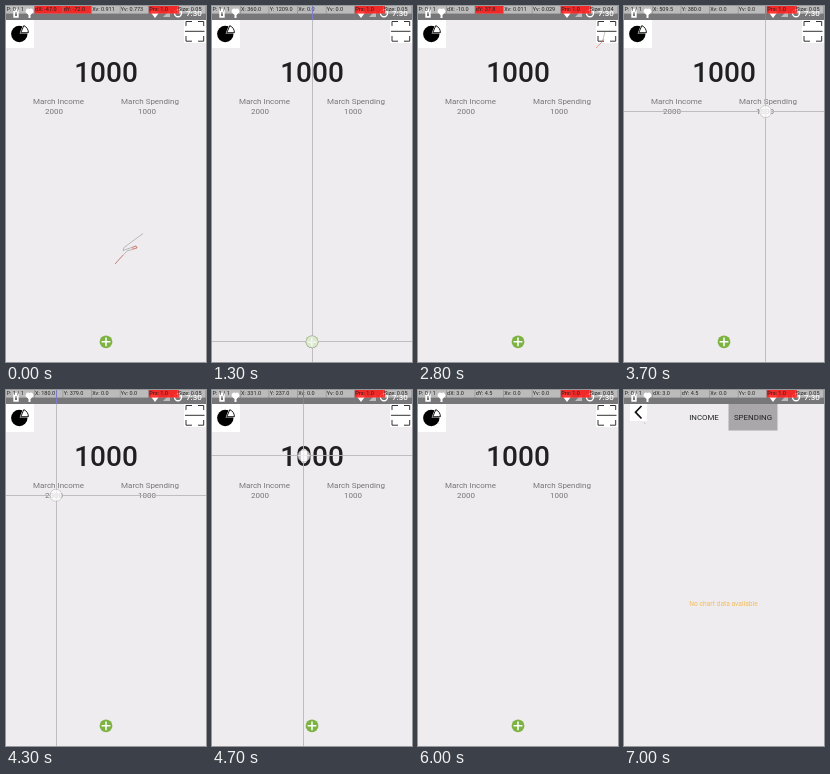
Animation, 200 px wide and 356 px high, one loop 8000 ms. Source, as an HTML page:

```html
<!DOCTYPE html>
<html lang="en">
<head>
<meta charset="utf-8">
<title>Budget overview</title>
<style>
html, body { margin: 0; width: 100%; height: 100%; overflow: hidden; background: #eeecef; }
svg { display: block; width: 100%; height: 100%; }
text { font-family: Roboto, sans-serif; }
.mid { text-anchor: middle; }
.label { font-size: 8px; fill: #767577; }
.tab { font-size: 7.9px; fill: #222; }
.cell { font-size: 5.5px; fill: #222; }
</style>
</head>
<body>
<svg viewBox="0 0 200 356">
  <rect width="200" height="356" fill="#eeecef"/>
  <g id="home">
    <path d="M0 14H28V42H0ZM178 14H200V37H178Z" fill="#fff"/>
    <circle cx="13.3" cy="28" r="8.2"/>
    <path d="M13.6 27.6L17.4 18H24V27.6Z" fill="#fff"/>
    <path d="M14.8 26.7L17.8 19.6A8 8 0 0 1 22.4 26.7Z" fill="#fff" stroke="#000" stroke-width=".9"/>
    <path d="M180 20V15.5H186M192 15.5H197.7V20M180 30V35.2H186M192 35.2H197.7V30M179 25.3H198.5" fill="none" stroke="#333" stroke-width="1"/>
    <text class="mid" x="100" y="76.2" font-size="28" font-weight="500" fill="#202022">1000</text>
    <g class="label mid">
      <text x="52.5" y="97.6">March Income</text><text x="48" y="108">2000</text>
      <text x="144" y="97.6">March Spending</text><text x="141" y="108">1000</text>
    </g>
    <circle cx="100" cy="335.8" r="6.4" fill="#7cb342"/>
    <path d="M95.6 335.8H104.4M100 331.4V340.2" stroke="#fff" stroke-width="1.5"/>
  </g>
  <g id="chart">
    <rect y="14" width="200" height="342" fill="#eeecef"/>
    <rect x="6" y="14" width="17" height="17" fill="#fff"/>
    <path d="M17.5 16L11.5 22.2L17.5 28.5" fill="none" stroke="#111" stroke-width="1.7"/>
    <rect x="104.5" y="14" width="49" height="26.5" fill="#a9a7a9"/>
    <text class="tab mid" x="80" y="30.2">INCOME</text>
    <text class="tab mid" x="129" y="30.2">SPENDING</text>
    <text id="empty" class="mid" x="99.5" y="216" font-size="6.7" fill="#f7bd55">No chart data available</text>
  </g>
  <g>
    <rect width="200" height="14" fill="#777678"/>
    <g fill="#fff">
      <path d="M7.3 3.8H8.5V2.8H11.5V3.8H12.7V11.8H7.3ZM23.5 3A2.5 2.5 0 0 1 26 7.5L24.5 9V12H22.5V9L21 7.5A2.5 2.5 0 0 1 23.5 3ZM144.5 6Q149 2 153.5 6L149 12Z"/>
      <path d="M157 11L164 4V11Z" opacity=".5"/>
      <path d="M9 6H11V10H9Z" fill="#777678"/>
      <text x="180" y="10.3" font-size="8" font-weight="500">7:30</text>
    </g>
    <circle cx="172" cy="7.3" r="3.5" fill="none" stroke="#fff" stroke-width="1.4"/>
  </g>
  <g id="bar"></g>
  <path id="trail" fill="none" stroke="#777" stroke-width=".45"/>
  <path id="vel" fill="none" stroke="#e8553a" stroke-width=".5"/>
  <g id="touch">
    <path id="cross" fill="none" stroke="#bab8ba" stroke-width=".9"/>
    <path id="tip" stroke="#77c" stroke-width=".9"/>
    <circle id="dot" r="6" fill="#fff" fill-opacity=".72" stroke="#aaa" stroke-width=".5"/>
  </g>
</svg>
<script>
const $ = id => document.getElementById(id);
const set = (el, attrs) => { for (const k in attrs) el.setAttribute(k, attrs[k]); };
const LOOP = 8000, STEP = 100, SCALE = 3.6, SLOP = 28, CELL = 200 / 7;

// Positions and travel are in device pixels, times in ms.
const gestures = [
  { down: -300, up: 0, x: 485, y: 943, dx: -47, dy: -72, xv: .911, yv: .773, size: .05,
    trail: 'M137 227.5L118 241.5L117 244.5L130 240L131 242L121 245L109 258',
    vel: 'M126 241.5L130 240L131 242L126 243M117 249L109 258' },
  { down: 1300, up: 1600, x: 360, y: 1209, dx: 2, dy: 3, xv: 0, yv: 0, size: .05 },
  { down: 2200, up: 2800, x: 674, y: 90, dx: -10, dy: 37.8, xv: .011, yv: .029, size: .04,
    vel: 'M186 33L184.5 35.5L178 42' },
  { down: 3500, up: 3900, x: 508, y: 379, dx: 3, dy: 2, xv: 0, yv: 0, size: .05 },
  { down: 4300, up: 4600, x: 180, y: 379, dx: 2, dy: 3, xv: 0, yv: 0, size: .05 },
  { down: 4700, up: 5100, x: 331, y: 237, dx: 47, dy: 9, xv: 1.595, yv: .36, size: .05,
    vel: 'M105 68.3L110 69' },
  { down: 5700, up: 6000, x: 73, y: 117, dx: 3, dy: 4.5, xv: 0, yv: 0, size: .05 }
];

const addTo = (parent, tag, attrs) => {
  const el = document.createElementNS('http://www.w3.org/2000/svg', tag);
  set(el, attrs);
  return parent.appendChild(el);
};
const cells = Array.from({ length: 7 }, (_, i) => {
  const box = { x: i * CELL, width: CELL - .4, height: 7.6 };
  addTo($('bar'), 'rect', { ...box, fill: '#fff', opacity: .5 });
  return {
    red: addTo($('bar'), 'rect', { ...box, fill: '#f00', opacity: .78 }),
    text: addTo($('bar'), 'text', { class: 'cell', x: box.x + .5, y: 5.4 })
  };
});
set(cells[6].red, { width: 1.4 });

const ease = p => p * p * (3 - 2 * p);
const snap = v => Math.floor(v) + .5;
const speed = v => v ? v.toFixed(3) : '0.0';
const show = (el, on) => { el.style.display = on ? '' : 'none'; };

function drawBar(g, active, x, y, p) {
  const labels = [
    `P: ${+active} / 1`,
    active ? `X: ${x.toFixed(1)}` : `dX: ${g.dx.toFixed(1)}`,
    active ? `Y: ${y.toFixed(1)}` : `dY: ${g.dy.toFixed(1)}`,
    `Xv: ${speed(g.xv * p)}`, `Yv: ${speed(g.yv * p)}`,
    'Prs: 1.0', `Size: ${g.size.toFixed(2)}`
  ];
  const far = d => !active && Math.abs(d) > SLOP;
  const reds = [false, far(g.dx), far(g.dy), false, false, true, true];
  cells.forEach((c, i) => {
    c.text.textContent = labels[i];
    show(c.red, reds[i]);
  });
}

function render(ms) {
  const t = Math.floor(ms / STEP) * STEP;
  const g = gestures.filter(a => a.down <= t).pop();
  const active = t < g.up;
  const p = active ? ease((t - g.down) / (g.up - g.down)) : 1;
  const x = g.x + g.dx * p, y = g.y + g.dy * p;
  const px = x / SCALE, py = y / SCALE;

  drawBar(g, active, x, y, p);
  set($('trail'), { d: g.trail || `M${g.x / SCALE} ${g.y / SCALE}L${px} ${py}` });
  set($('vel'), { d: !active && g.vel || '' });
  show($('touch'), active);
  set($('cross'), { d: `M${snap(px)} 0V356M0 ${snap(py)}H200` });
  set($('tip'), { d: `M${snap(px)} 0V14` });
  set($('dot'), { cx: px, cy: py });

  const open = Math.max(0, Math.min(1, (t - 6300) / 300));
  set($('chart'), { opacity: open, transform: `translate(0 ${14 * (1 - open) ** 2})` });
  show($('home'), open < 1);
  show($('empty'), t >= 7000);
}

const start = performance.now();
(function frame() {
  render((performance.now() - start) % LOOP);
  requestAnimationFrame(frame);
})();
</script>
</body>
</html>
```
